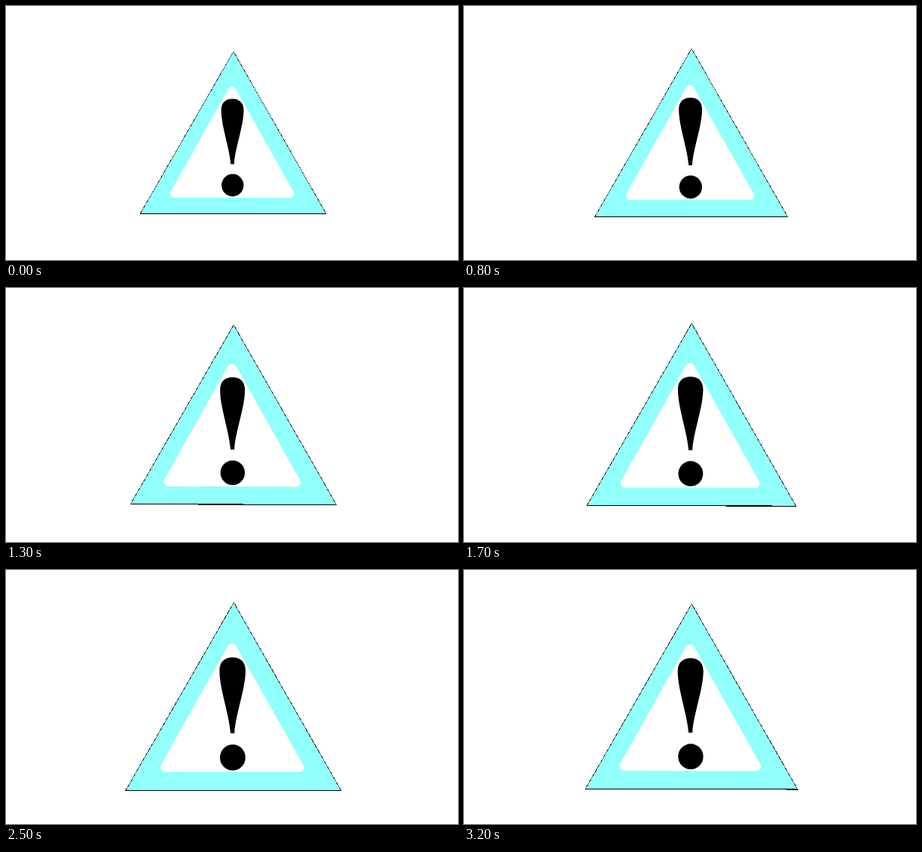
Write an HTML page that moves like this. It is 600 px wide and 338 px high and loops after 3300 ms.

```html
<!DOCTYPE html>
<html lang="en">
<head>
<meta charset="utf-8">
<title>Warning sign</title>
<style>
  html, body { margin: 0; width: 100%; height: 100%; overflow: hidden; background: #fff; }
  svg { display: block; width: 100%; height: 100%; }
</style>
</head>
<body>
<svg viewBox="0 0 600 338">
  <g id="sign">
    <!-- the dark triangle shows past the light one as a broken hairline -->
    <g shape-rendering="crispEdges">
      <path d="M302 60 L425.8 277.2 L177.5 276.95 Z"/>
      <path d="M302 61.15 L424.6 276.25 L178.7 276 Z" fill="#91fffa"/>
    </g>
    <path d="M300 113 L376.8 249.8 L223.5 249.4 Z" fill="#fff" stroke="#fff" stroke-width="11" stroke-linejoin="round"/>
    <path d="M298.3 210.6 C296.7 188.6 285.7 160 285.7 138.7 C285.7 127.7 292.7 123.6 300.6 123.6 C308.5 123.6 315.5 127.7 315.5 138.7 C315.5 160 304.1 188.6 302.8 210.6 Z"/>
    <ellipse cx="300.8" cy="238.5" rx="14.6" ry="14.9"/>
  </g>
</svg>
<script>
  const sign = document.getElementById('sign');
  const STEP = 100;       // ms each pose is held
  const LEVELS = 11;      // sizes in one zoom
  const ADVANCE = 3;      // sizes gained per step before wrapping
  const GROWTH = 0.0177;  // scale gained per size

  function draw(ms) {
    const level = Math.floor(ms / STEP) * ADVANCE % LEVELS;
    const scale = 1 + GROWTH * level;
    sign.setAttribute('transform', `translate(300 169) scale(${scale}) translate(-300 -169)`);
  }

  const start = performance.now();
  function tick() {
    draw(performance.now() - start);
    requestAnimationFrame(tick);
  }
  tick();
</script>
</body>
</html>
```
